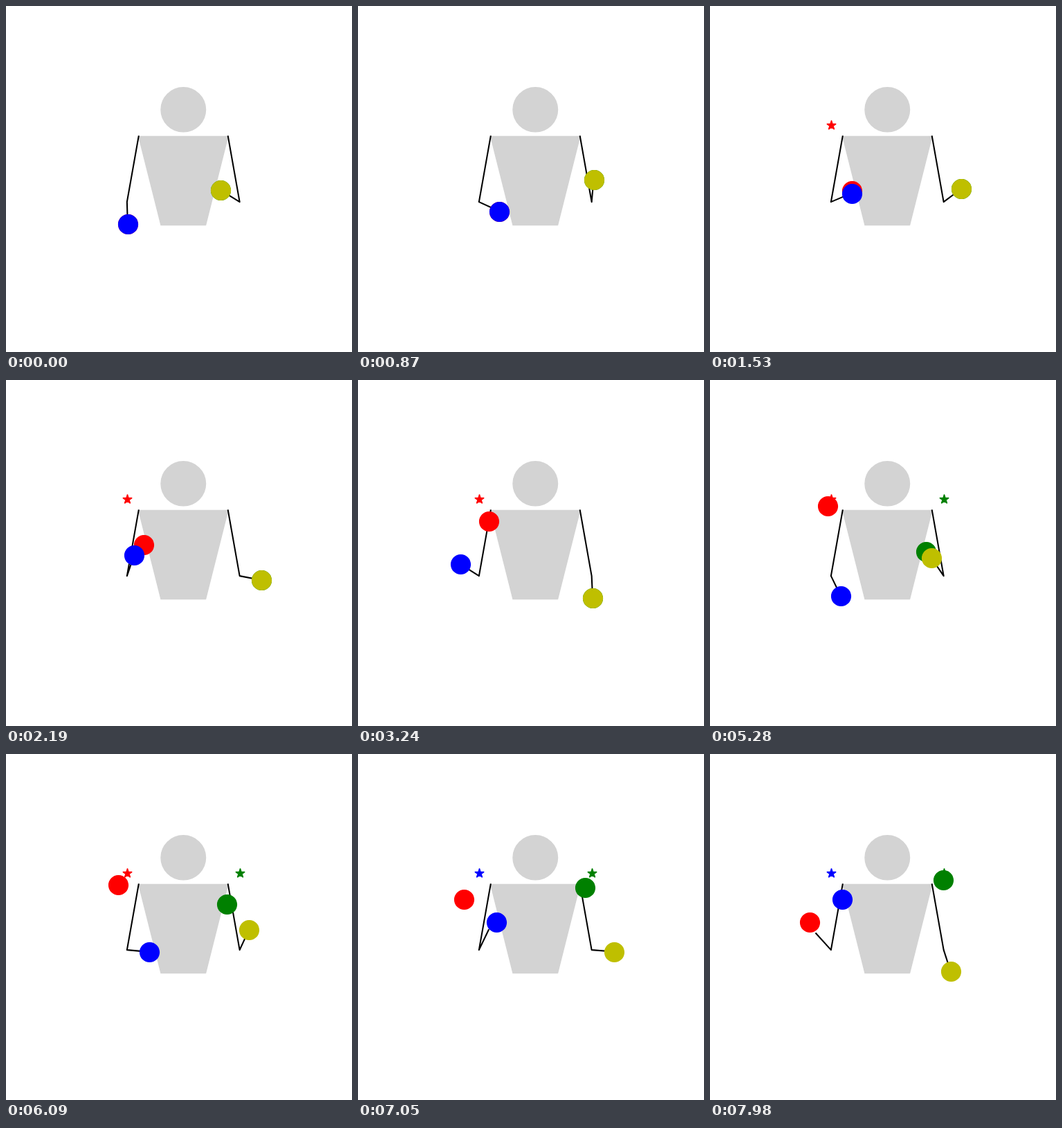
An HTML page with a canvas that plays this animation: 500x500 px, repeating every 8 s.

```html
<!DOCTYPE html>
<html lang="en">
<head>
<meta charset="utf-8">
<title>Juggler</title>
<style>
html, body { margin: 0; width: 100%; height: 100%; overflow: hidden; background: #fff; }
canvas { display: block; }
</style>
</head>
<body>
<canvas id="stage" width="500" height="500"></canvas>
<script>
const ctx = document.getElementById('stage').getContext('2d');
const LOOP = 8000, STEP = 30;
const SPEED = 2 * Math.PI / 4950;             // hand rotation per ms
const CX = 256.25, CY = 252.5, UX = 32.29, UY = 32.08;
const LEFT = -1, RIGHT = 1;
const SHOULDER = [2, 2], ELBOW = [2.521, -0.954];
const PHASE = { [LEFT]: 91.8, [RIGHT]: 211.8 }; // degrees, mirrored for the left

// Listed in painting order
const BALLS = [
  { color: '#f00', side: LEFT, release: 1213 },
  { color: '#008000', side: RIGHT, release: 4540 },
  { color: '#00f', side: LEFT, release: 6205 },
  { color: '#bfbf00', side: RIGHT, release: Infinity }
];

const px = ([x, y], side = RIGHT) => [CX + side * x * UX, CY - y * UY];
const snap = point => point.map(v => Math.round(v) + 0.5);

function handAt(side, t) {
  const a = PHASE[side] * Math.PI / 180 + SPEED * t;
  return px([ELBOW[0] + Math.cos(a), ELBOW[1] - Math.sin(a)], side);
}

function ballAt({ side, release }, t) {
  const flight = t - release;
  if (flight < 0) return handAt(side, t);
  return [
    CX + side * (48.35 + 0.0094 * flight),
    181.2 + 0.705e-5 * (flight - 3812) ** 2
  ];
}

function trace(points) {
  ctx.beginPath();
  points.forEach(p => ctx.lineTo(...p));
}

function paint(color) {
  ctx.fillStyle = ctx.strokeStyle = color;
  ctx.lineWidth = 1.39;
  ctx.fill();
  ctx.stroke();
}

function drawBody() {
  ctx.lineJoin = 'miter';
  ctx.beginPath();
  ctx.ellipse(...px([0, 3.2]), UX, UY, 0, 0, 2 * Math.PI);
  paint('#d3d3d3');
  trace([px([-2, 2]), px([2, 2]), px([1, -2]), px([-1, -2])]);
  ctx.closePath();
  paint('#d3d3d3');
}

function drawArm(side, t) {
  trace([px(SHOULDER, side), px(ELBOW, side), handAt(side, t)]);
  ctx.strokeStyle = '#000';
  ctx.lineWidth = 2.08;
  ctx.lineJoin = 'round';
  ctx.lineCap = 'square';
  ctx.stroke();
}

// The star takes the colour of the latest throw on its side
function drawStar(side, t) {
  const thrown = BALLS.filter(b => b.side === side && b.release <= t).pop();
  if (!thrown) return;
  const [x, y] = snap(px([ELBOW[0], 2.5], side));
  trace(Array.from({ length: 10 }, (_, i) => {
    const r = i % 2 ? 2.65 : 6.94, a = i * Math.PI / 5;
    return [x + r * Math.sin(a), y - r * Math.cos(a)];
  }));
  ctx.closePath();
  ctx.lineJoin = 'bevel';
  paint(thrown.color);
}

function drawBall(ball, t) {
  ctx.beginPath();
  ctx.arc(...snap(ballAt(ball, t)), 13.89, 0, 2 * Math.PI);
  paint(ball.color);
}

function frame(now) {
  const t = Math.floor((now % LOOP) / STEP) * STEP;
  ctx.fillStyle = '#fff';
  ctx.fillRect(0, 0, 500, 500);
  drawBody();
  for (const side of [LEFT, RIGHT]) {
    drawArm(side, t);
    drawStar(side, t);
  }
  BALLS.forEach(ball => drawBall(ball, t));
}

const start = performance.now();
function tick() {
  frame(performance.now() - start);
  requestAnimationFrame(tick);
}
tick();
</script>
</body>
</html>
```
